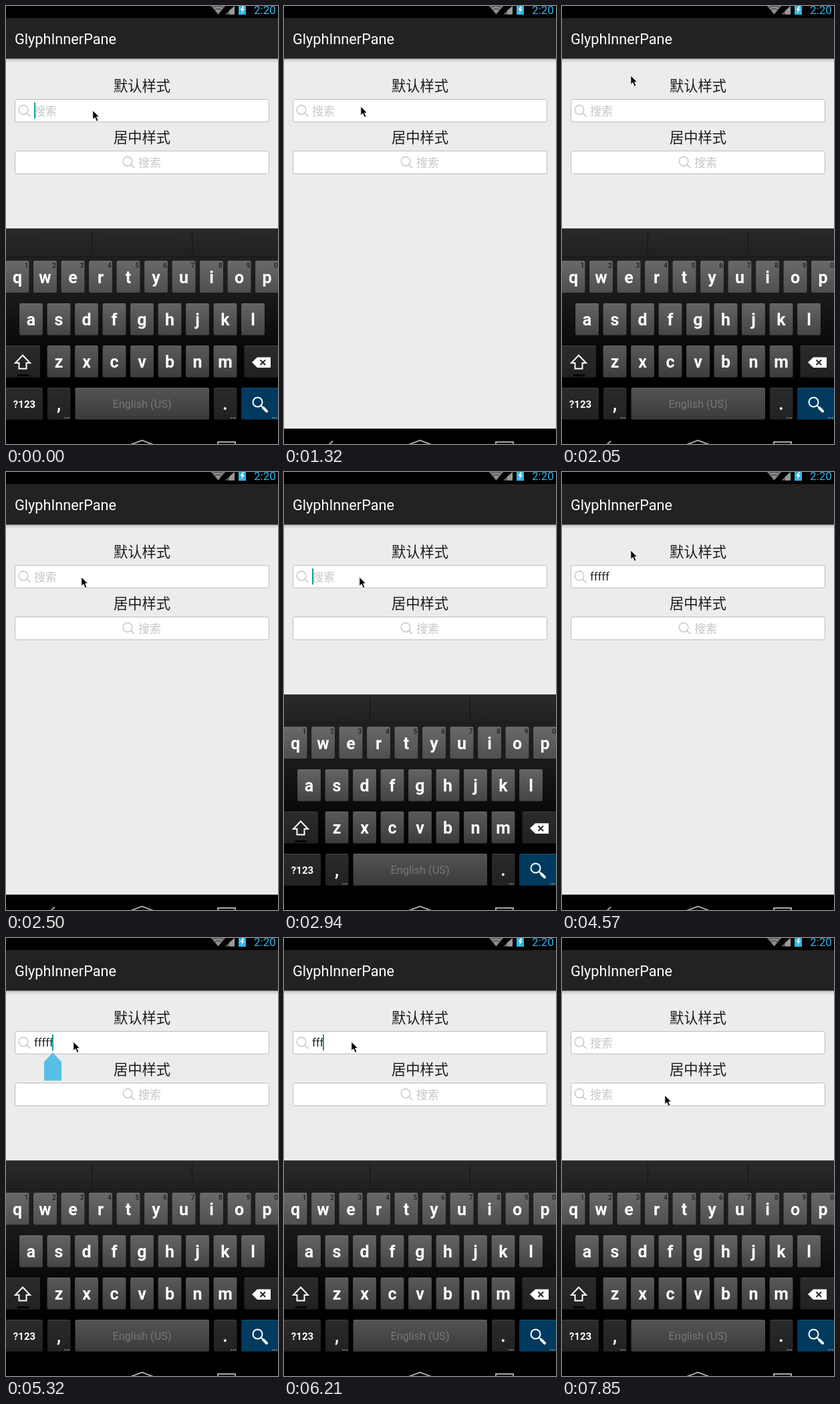
These frames come from a looping animation (407 px wide and 654 px high, 8000 ms). An HTML page:

```html
<!DOCTYPE html>
<html lang="zh-CN">
<head>
<meta charset="utf-8">
<title>Search field demo</title>
<style>
html, body { margin: 0; width: 100%; height: 100%; overflow: hidden; background: #ececec; }
#stage {
  position: relative; width: 407px; height: 654px; overflow: hidden;
  font-family: Roboto, "Noto Sans CJK SC", "Noto Sans CJK", sans-serif;
  animation: type 8s step-end infinite, blink 8s step-end infinite,
    keys 8s step-end infinite, back 8s step-end infinite, focus 8s step-end infinite;
}
svg { position: absolute; left: 0; top: 0; display: block; overflow: hidden; }
.label { font-size: 21.3px; fill: #1c1c1c; text-anchor: middle; }
.box { fill: #fff; stroke: #bcbcbc; }
.lens { fill: none; stroke: #bdbdbd; stroke-width: 1.2; }
.hint { font-size: 17px; fill: #c6c6c6; }
#hint1 { opacity: calc(1 - var(--n)); }
#search2 { transform: translateX(calc(var(--f) * -156px)); }
#board { opacity: var(--k); }
#back { opacity: var(--b); }
#grip { opacity: var(--h); animation: grip 8s step-end infinite; }
.cap { font-weight: 700; font-size: 25px; fill: #fff; text-anchor: middle; }
.num { font-weight: 700; font-size: 10.5px; fill: #2b2b2b; text-anchor: middle; }
.nav { fill: none; stroke: #a8a8a8; stroke-width: 2; }
#typed {
  position: absolute; left: 42px; top: 146px; height: 22px; line-height: 22px;
  width: calc(var(--n) * 5.75px); overflow: hidden; white-space: nowrap;
  font-size: 16.5px; color: #1c1c1c; font-variant-ligatures: none;
}
#caret {
  position: absolute; left: calc(42px + var(--n) * 5.4px); top: 144px;
  width: 2px; height: 24px; background: #14a08f; opacity: var(--c);
}
#mouse { width: 13px; height: 20px; overflow: visible; animation: mouse 8s step-end infinite; }

@keyframes type {
  0% { --n: 0 } 38.625% { --n: 1 } 42.25% { --n: 2 } 44.125% { --n: 3 }
  46% { --n: 4 } 47.875% { --n: 5 } 75.75% { --n: 4 } 77.625% { --n: 3 }
  79.5% { --n: 2 } 81.375% { --n: 1 } 83.25% { --n: 0 }
}
@keyframes blink {
  0%, 22%, 36.75%, 66.5%, 75.75% { --c: 1 }
  3.625%, 25.625%, 55.25%, 72.125%, 88.875% { --c: 0 }
}
@keyframes keys {
  0%, 20.125%, 34.875%, 64.625%, 96.25% { --k: 1 }
  11%, 27.5%, 57.125%, 90.75% { --k: 0 }
}
@keyframes back {
  0%, 20.125%, 34.875%, 64.625%, 96.25% { --b: 0 }
  9.125%, 25.625%, 55.25%, 88.875% { --b: 1 }
}
@keyframes grip { 0%, 75.75% { --h: 0 } 66.5% { --h: 1 } }
@keyframes focus { 0% { --f: 0 } 96.25% { --f: 1 } }
@keyframes mouse {
  0% { transform: translate(129px, 155px) }
  3.625% { transform: translate(116px, 134px) }
  5.5% { transform: translate(103px, 113px) }
  12.875% { transform: translate(107px, 125px) }
  14.625% { transform: translate(111px, 138px) }
  16.5% { transform: translate(114px, 149px) }
  23.875% { transform: translate(108px, 126px) }
  25.625% { transform: translate(102px, 103px) }
  29.375% { transform: translate(107px, 130px) }
  31.25% { transform: translate(112px, 156px) }
  38.625% { transform: translate(112px, 152px) }
  49.625% { transform: translate(107px, 134px) }
  51.5% { transform: translate(102px, 116px) }
  59% { transform: translate(101px, 136px) }
  60.875% { transform: translate(100px, 154px) }
  87% { transform: translate(116px, 190px) }
  88.875% { transform: translate(136px, 240px) }
  90.75% { transform: translate(144px, 264px) }
  92.625% { transform: translate(150px, 248px) }
  94.375% { transform: translate(153px, 234px) }
}
</style>
</head>
<body>
<div id="stage">
  <svg width="407" height="654" viewBox="0 0 407 654">
    <defs>
      <linearGradient id="shade" x2="0" y2="1">
        <stop stop-color="#8a8a8a"/><stop offset=".3" stop-color="#cfcfcf"/><stop offset="1" stop-color="#ececec"/>
      </linearGradient>
      <linearGradient id="panel" x2="0" y2="1">
        <stop stop-color="#2a2a2a"/><stop offset=".14" stop-color="#202020"/>
        <stop offset=".35" stop-color="#191919"/><stop offset=".6" stop-color="#080808"/><stop offset=".78"/>
      </linearGradient>
      <linearGradient id="light" x2="0" y2="1">
        <stop stop-color="#fff" stop-opacity=".33"/><stop offset="1" stop-color="#fff" stop-opacity=".23"/>
      </linearGradient>
      <linearGradient id="dark" x2="0" y2="1">
        <stop stop-color="#2b2b2b"/><stop offset="1" stop-color="#212121"/>
      </linearGradient>
      <g id="lens" class="lens"><circle cx="26" cy="155" r="6.8"/><path d="M31 160l5.5 5"/></g>
    </defs>

    <rect width="407" height="654" fill="#ececec"/>
    <rect y="78" width="407" height="7" fill="url(#shade)"/>
    <rect width="407" height="18"/>
    <rect y="18" width="407" height="60.5" fill="#222"/>
    <path d="M307 0H328L317.500 12.500Z" fill="#8c8c8c"/>
    <path d="M309 2.500q8.500-5 17 0M312 6q5.500-4 11 0" fill="none" stroke="#333"/>
    <path d="M328 12.500L342 0V12.500Z" fill="#666"/>
    <path d="M334 12.500V7L342 0V12.500Z" fill="#9a9a9a"/>
    <rect x="348" width="11" height="13" fill="#33b5e5"/>
    <path d="M354.500 0L350.500 6H353.500L351.500 11L357 4.500H353.800L356 0Z" fill="#fff"/>
    <text x="371" y="11.500" font-size="17" fill="#33b5e5">2:20</text>
    <text x="13" y="57" font-size="21.700" fill="#fff">GlyphInnerPane</text>

    <text class="label" x="203.500" y="126.500">默认样式</text>
    <text class="label" x="203.500" y="203.500">居中样式</text>
    <rect class="box" x="13.500" y="139.500" width="380" height="33.500" rx="3"/>
    <rect class="box" x="13.500" y="216.500" width="380" height="34" rx="3"/>
    <use href="#lens"/>
    <text id="hint1" class="hint" x="42" y="163">搜索</text>
    <g id="search2">
      <use href="#lens" x="156" y="77"/>
      <text class="hint" x="198" y="240">搜索</text>
    </g>
    <path id="grip" d="M70 171L83 185V213H57V185Z" fill="#33b5e5" fill-opacity=".8"/>

    <rect y="631" width="407" height="23"/>
    <g id="board">
      <rect y="332" width="407" height="299" fill="url(#panel)"/>
      <path d="M0 332.500H407" stroke="#444"/>
      <path d="M128.500 337V372M278.500 337V372" stroke="#141414"/>
      <path d="M0 374.500H407" stroke="#171717"/>
      <g id="caps"></g>
      <path d="M25 521.500L36 533H30.500V541.500H19.500V533H14Z" fill="none" stroke="#fff" stroke-width="2"/>
      <rect x="17" y="550" width="17" height="3"/>
      <path d="M368 532L376 524.500H396V540H376Z" fill="#fff"/>
      <path d="M380.500 528.500l7.500 7.500m0-7.500l-7.500 7.500" stroke="#262626" stroke-width="2"/>
      <g fill="none" stroke="#fff" stroke-linecap="round">
        <circle cx="376.500" cy="591.500" r="7" stroke-width="2"/>
        <path d="M382 597l2 2" stroke-width="2"/><path d="M385 600l5 5" stroke-width="4"/>
      </g>
      <text x="203.500" y="600" font-size="16.300" fill="#777" text-anchor="middle">English (US)</text>
      <path d="M87.500 615H95M336.500 615H344M398 615H405.500" stroke="#aaa" stroke-width="1.500" stroke-dasharray="1.500"/>
    </g>
    <path id="back" class="nav" d="M73 649.500L66 656"/>
    <path class="nav" d="M185 655.500L203.500 648.500L222 655.500M317 656V651H343V656"/>
  </svg>
  <div id="typed">fffff</div>
  <div id="caret"></div>
  <svg id="mouse" viewBox="0 0 13 20">
    <path d="M.8 .8V14.500L4 11.600L6.400 17.300L9 16.200L6.600 10.700H10.800Z" fill="#000" stroke="#fff"/>
  </svg>
</div>
<script>
const caps = document.getElementById('caps');

function add(tag, attrs, text = '') {
  const el = document.createElementNS('http://www.w3.org/2000/svg', tag);
  for (const name in attrs) el.setAttribute(name, attrs[name]);
  el.textContent = text;
  caps.append(el);
}

function key(x, y, width, fill = 'url(#light)') {
  add('rect', { x, y, width, height: 47.5, rx: 2, fill });
  add('path', { d: `M${x + 1} ${y + 0.5}h${width - 2}`, stroke: '#fff', 'stroke-opacity': 0.1 });
}

function row(letters, x, y, numbered) {
  [...letters].forEach((letter, i) => {
    const mid = x + i * 41.5;
    key(mid - 17.4, y, 34.8);
    add('text', { class: 'cap', x: mid, y: y + 33 }, letter);
    if (numbered) add('text', { class: 'num', x: mid + 13.5, y: y + 10 }, (i + 1) % 10);
  });
}

row('qwertyuiop', 17, 380.5, true);
row('asdfghjkl', 37.5, 444);
row('zxcvbnm', 79, 507);

const dark = 'url(#dark)';
key(-1, 507, 52, dark);
key(356.5, 507, 52, dark);
key(-1, 570, 56, dark);
key(62, 570, 34.5, dark);
key(103.5, 570, 200.5);
key(311, 570, 34.5, dark);
key(352, 570, 56, '#003a5e');
add('text', { class: 'cap', x: 27.5, y: 600, style: 'font-size:15px' }, '?123');
add('text', { class: 'cap', x: 79, y: 603 }, ',');
add('text', { class: 'cap', x: 328, y: 603 }, '.');
</script>
</body>
</html>
```
